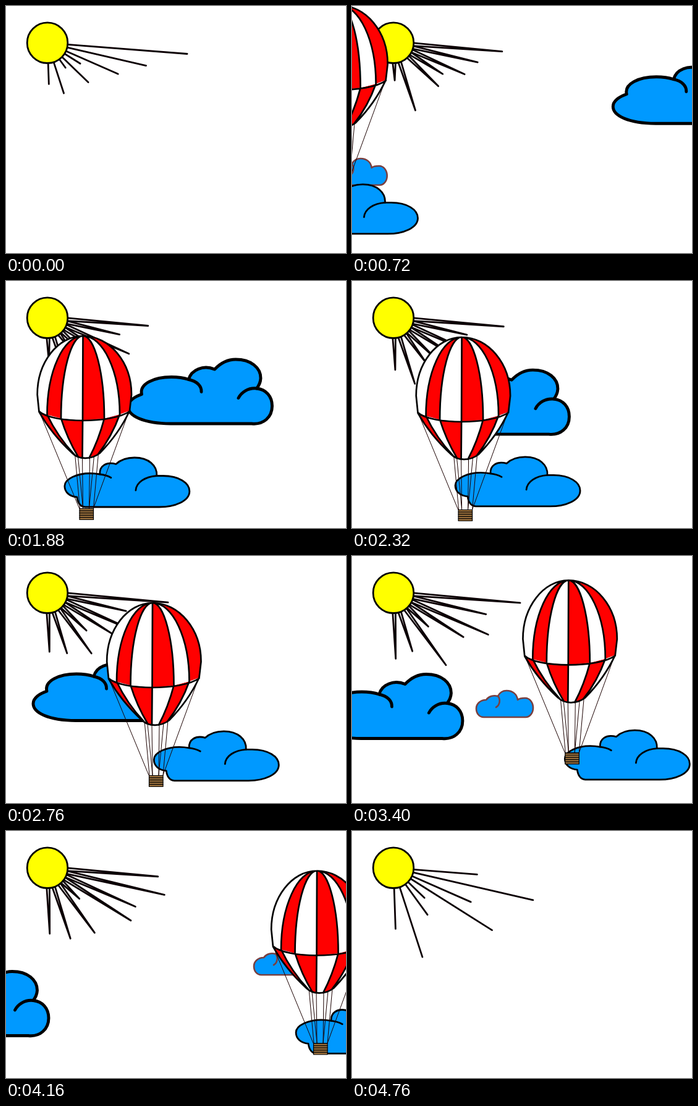
Recreate the animation shown at these times as an HTML page with a canvas. Size 550 px wide and 400 px high, loop 4.8 s.

```html
<!DOCTYPE html>
<html lang="en">
<head>
<meta charset="utf-8">
<title>Balloon ride</title>
<style>
html, body { margin: 0; width: 100%; height: 100%; overflow: hidden; background: #fff; }
canvas { display: block; }
</style>
</head>
<body>
<canvas id="stage" width="550" height="400"></canvas>
<script>
const ctx = document.getElementById('stage').getContext('2d');
const STEP = 40, STEPS = 120;
const BLUE = '#0099ff', RED = '#ff0000', WHITE = '#fff', INK = '#000';
const SUN = { x: 67, y: 59.7, r: 32.8 };

// Turning points of each flight path
const balloonPath = [
  { n: 12, x: -50, y: 15 }, { n: 21, x: -6, y: -4 }, { n: 31, x: 45, y: 29 },
  { n: 47, x: 124.5, y: 89 }, { n: 69, x: 237, y: 76 }, { n: 92, x: 405, y: 35.5 },
  { n: 104, x: 503, y: 64.5 }, { n: 119, x: 637, y: 110 }
];
const bigCloudPath = [
  { n: 31, x: 321.5, y: 208 }, { n: 47, x: 197.5, y: 230.5 },
  { n: 69, x: 44, y: 266 }, { n: 104, x: -164, y: 331 }
];
const smallCloudPath = [
  { n: 31, x: 20, y: 264 }, { n: 47, x: 88, y: 232 }, { n: 69, x: 145, y: 250 },
  { n: 85, x: 201, y: 261 }, { n: 104, x: 401, y: 233 }
];

// Ray length runs from first to last, bent by a half wave (arch) and a full wave
const rays = [
  { angle: 4.5, first: 194, last: 103, arch: 0, wave: -45 },
  { angle: 13, first: 131, last: 199, arch: -75, wave: 0 },
  { angle: 23.8, first: 92, last: 104, arch: 25, wave: -15 },
  { angle: 32.3, first: 30, last: 156, arch: -3, wave: 17 },
  { angle: 44, first: 59, last: 37, arch: 13, wave: 8 },
  { angle: 54, first: 17, last: 61, arch: 25, wave: -45 },
  { angle: 72, first: 53, last: 119, arch: -8, wave: 28 },
  { angle: 88, first: 34, last: 66, arch: 3, wave: -15 }
];

const mix = (a, b, u) => a + (b - a) * u;

// Cubic Hermite curve through the points, straight beyond both ends
function along(path, n) {
  let i = 0;
  while (i < path.length - 2 && n >= path[i + 1].n) i++;
  const a = path[i], b = path[i + 1], span = b.n - a.n, u = (n - a.n) / span;
  const rate = (p, q, k) => (q[k] - p[k]) / (q.n - p.n);
  const slope = (j, k) => {
    const p = path[j - 1], c = path[j], q = path[j + 1];
    if (!p) return rate(c, q, k);
    if (!q) return rate(p, c, k);
    return mix(rate(p, c, k), rate(c, q, k), (c.n - p.n) / (q.n - p.n));
  };
  const at = k => {
    if (u < 0 || u > 1) return mix(a[k], b[k], u);
    const ease = u * u * (3 - 2 * u), v = 1 - u;
    return mix(a[k], b[k], ease) + span * u * v * (v * slope(i, k) - u * slope(i + 1, k));
  };
  return [at('x'), at('y')];
}

function cloud(outline, folds, ink, width) {
  return { body: new Path2D(outline), folds: new Path2D(folds), ink, width };
}

const frontCloud = cloud(
  'M1,-34 C1,-46 22,-54.5 42,-54.5 Q50,-54.5 58,-53 C57,-66 68,-74 84,-69.5 C92,-77 104,-80 114,-80 ' +
  'C137,-80 151,-67 150,-50.5 L160,-50.5 C186,-50.5 203,-39 203,-25.5 C203,-10 180,0.5 152,0 L34,0 ' +
  'C25,-1 22,-8 21,-16 C9,-17 1,-24 1,-34 Z',
  'M58,-53 Q68,-52 76,-47.5 M116,-27 C117,-40 131,-49 150,-50.5', INK, 2.8);
const bigCloud = cloud(
  'M0,-27 C0,-36 10,-43 22,-47 C18,-64 42,-75 70,-75 Q86,-75 98,-71 C102,-87 122,-95 140,-87.5 ' +
  'C150,-98 160,-103.5 174,-103.5 C199,-103.5 214.5,-90 214.5,-73 Q214,-64 208,-56.5 ' +
  'C223,-55 233,-44 233,-28 C233,-10 219,2.5 200,0.5 L69,0.5 C25,0 0,-12 0,-27 Z',
  'M98,-71 C112,-68 119,-60 118.5,-51 M178.5,-41 C183,-50 194,-58 208,-56.5', INK, 4.9);
const smallCloud = cloud(
  'M12,0 C5,0 0,-6 0,-14 C0,-22 7,-28 16,-28 C20,-34 28,-36 35,-34 C38,-40 43,-43 49,-43 ' +
  'C59,-43 66,-37 67,-28 C70,-31 75,-31 79,-31 C87,-31 92,-23 92,-15 C92,-6 86,0 80,0 Z',
  'M35,-34 C39,-30 39,-20 32,-16', '#7a4040', 2.6);

// Seams left to right: x at the waist and at the foot of the skirt
const seams = [[-71, -17], [-58, -14], [-35.5, -8], [-0.5, -1], [34.5, 10], [59.5, 24], [75.5, 27]]
  .map(([x, footX], i, all) => {
    const side = i === 0 || i === all.length - 1;
    const y = 137 - 15 * (x / 73) ** 2, footY = 198 - 8 * ((footX - 5) / 22) ** 2;
    const reach = side ? x * 1.04 : x, widest = side ? 95 : y;
    return {
      waist: `${x},${y}`,
      foot: `${footX},${footY}`,
      bend: `${(x + footX) / 2 + x * 0.09},${(y + footY) / 2 + 3}`,
      down: `C${reach * 0.55},0 ${reach},${widest * 0.45} ${reach},${widest} L${x},${y}`,
      up: `L${reach},${widest} C${reach},${widest * 0.45} ${reach * 0.55},0 0,0`
    };
  });
const gores = seams.slice(1).map((right, i) => {
  const left = seams[i];
  return {
    top: new Path2D(`M0,0 ${left.down} L${right.waist} ${right.up} Z`),
    skirt: new Path2D(`M${left.waist} Q${left.bend} ${left.foot} L${right.foot} Q${right.bend} ${right.waist} Z`),
    topColor: i % 2 ? RED : WHITE,
    skirtColor: i % 2 ? WHITE : RED
  };
});
const seamLines = new Path2D(
  seams.map(s => `M0,0 ${s.down} Q${s.bend} ${s.foot}`).join(' ') +
  ' M-71,122 C-50,142 48,142 75.5,122 M-17,190 C-6,201 14,200 27,190');
const strings = new Path2D('M-70,124 L-6,279 M-13,191 L-5,279 M-8,196 L0,279 M-1,198 L0,279 ' +
  'M11,197 L10,279 M18,194 L10,279 M25,190 L17,279 M73,126 L17,279');

function pen(color, width) {
  ctx.strokeStyle = color;
  ctx.lineWidth = width;
}

function fill(shape, color) {
  ctx.fillStyle = color;
  ctx.fill(shape);
}

function placed(x, y, paint) {
  ctx.save();
  ctx.translate(x, y);
  paint();
  ctx.restore();
}

function drawSun(n) {
  const p = n / (STEPS - 1);
  const spread = 0.07 * Math.min(1, n / 8, (STEPS - 1 - n) / 8);
  placed(SUN.x, SUN.y, () => {
    pen('#0c0004', 2.8);
    for (const { angle, first, last, arch, wave } of rays) {
      const a = angle * Math.PI / 180;
      const tip = SUN.r + mix(first, last, p) + arch * Math.sin(Math.PI * p) + wave * Math.sin(2 * Math.PI * p);
      ctx.beginPath();
      for (const base of [a - spread, a + spread]) {
        ctx.moveTo(SUN.r * Math.cos(base), SUN.r * Math.sin(base));
        ctx.lineTo(tip * Math.cos(a), tip * Math.sin(a));
      }
      ctx.stroke();
    }
    const disc = new Path2D();
    disc.arc(0, 0, SUN.r, 0, 2 * Math.PI);
    fill(disc, '#ffff00');
    pen(INK, 2.8);
    ctx.stroke(disc);
  });
}

function drawCloud(shape, x, y) {
  placed(x, y, () => {
    fill(shape.body, BLUE);
    pen(shape.ink, shape.width);
    ctx.stroke(shape.body);
    ctx.stroke(shape.folds);
  });
}

function drawBasket() {
  const left = -5.5, top = 279.5, width = 22.5, height = 18;
  ctx.fillStyle = '#996f3c';
  ctx.fillRect(left, top, width, height);
  pen(INK, 1.2);
  ctx.strokeRect(left, top, width, height);
  ctx.beginPath();
  for (let y = top; y < top + height; y += height / 5) {
    ctx.moveTo(left, y);
    ctx.lineTo(left + width, y);
  }
  ctx.stroke();
}

function drawBalloon(x, y) {
  placed(x, y, () => {
    pen('#1a0000', 1);
    ctx.stroke(strings);
    for (const g of gores) {
      fill(g.skirt, g.skirtColor);
      fill(g.top, g.topColor);
    }
    pen(INK, 2.7);
    ctx.stroke(seamLines);
    drawBasket();
  });
}

function draw(n) {
  ctx.fillStyle = WHITE;
  ctx.fillRect(0, 0, 550, 400);
  ctx.lineCap = ctx.lineJoin = 'round';
  drawSun(n);
  drawCloud(smallCloud, ...along(smallCloudPath, n));
  drawCloud(bigCloud, ...along(bigCloudPath, n));
  drawCloud(frontCloud, 6.565 * n - 214.7, 370.7 - 0.1 * n);
  drawBalloon(...along(balloonPath, n));
}

let start = null;
function tick(now) {
  if (start === null) start = now;
  draw(Math.floor(Math.max(0, now - start) / STEP) % STEPS);
  requestAnimationFrame(tick);
}
draw(0);
requestAnimationFrame(tick);
</script>
</body>
</html>
```
